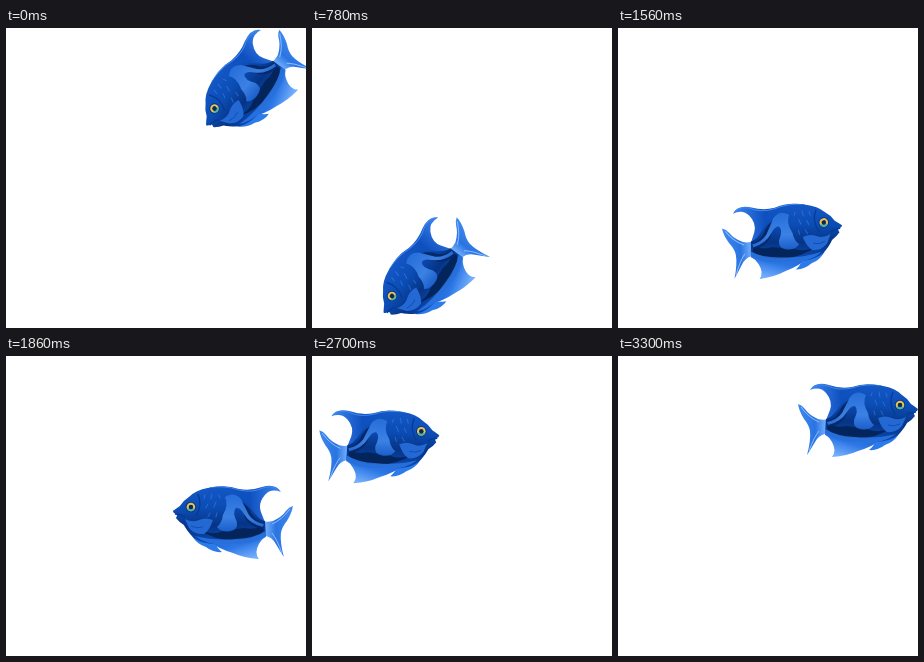
An HTML page that plays this animation: 300 by 300 pixels, repeating every 3360 ms.

```html
<!DOCTYPE html>
<html lang="en">
<head>
<meta charset="utf-8">
<title>Blue fish</title>
<style>
html, body { margin: 0; width: 100%; height: 100%; overflow: hidden; background: #fff; }
svg { display: block; width: 100vw; height: 100vh; }
</style>
</head>
<body>
<svg viewBox="0 0 300 300">
  <defs>
    <linearGradient id="body" x1="0" y1="0" x2="0.1" y2="1">
      <stop offset="0" stop-color="#1559c8"/>
      <stop offset="0.4" stop-color="#0b4cb4"/>
      <stop offset="0.7" stop-color="#063484"/>
      <stop offset="1" stop-color="#0b4ab4"/>
    </linearGradient>
    <linearGradient id="dorsal" x1="0" y1="0" x2="1" y2="0">
      <stop offset="0" stop-color="#1358c8"/>
      <stop offset="0.6" stop-color="#0f50bf"/>
      <stop offset="1" stop-color="#3f88f0"/>
    </linearGradient>
    <linearGradient id="anal" x1="0" y1="0" x2="0.7" y2="1">
      <stop offset="0" stop-color="#0d50c4"/>
      <stop offset="0.6" stop-color="#2d78e6"/>
      <stop offset="1" stop-color="#74aefc"/>
    </linearGradient>
    <linearGradient id="tail" x1="0" y1="0" x2="1" y2="0">
      <stop offset="0" stop-color="#1a5fd2"/>
      <stop offset="0.3" stop-color="#6aa8f8"/>
      <stop offset="0.55" stop-color="#2a74e2"/>
      <stop offset="1" stop-color="#3f88f0"/>
    </linearGradient>
    <linearGradient id="band" x1="0" y1="0" x2="0" y2="1">
      <stop offset="0" stop-color="#2a70dc"/>
      <stop offset="0.6" stop-color="#4189ec"/>
      <stop offset="1" stop-color="#1c62d2"/>
    </linearGradient>
  </defs>
  <g id="fish">
    <!-- tail -->
    <path fill="url(#tail)" d="M22-3Q32 1 40-1Q49-5 53-11Q56-15 60-16Q59-9 54-1Q49 5 48 11Q47 20 51 35Q47 29 43 22Q39 15 33 14L22 16Z"/>
    <path fill="none" stroke="#8bbcfc" stroke-width="1" d="M39 2Q49-2 57-13M39 11Q44 17 49 31"/>
    <!-- anal and pelvic fins -->
    <path fill="url(#anal)" d="M-26 18Q-14 27 0 31Q11 36 26 37Q21 31 26 22Q28 18 33 14L10 10Z"/>
    <path fill="#2d7bea" d="M-41 14Q-36 22-27 25Q-19 31-11 30Q-16 26-18 20Z"/>
    <!-- dorsal fin -->
    <path fill="url(#dorsal)" d="M-30-32Q-11-39 6-33Q18-31 29-35Q43-39 48-30Q38-34 32-27Q25-19 28-10L32 0L10-3Z"/>
    <path fill="none" stroke="#3f88ee" stroke-width="1" d="M-24-34Q-9-37 6-32Q20-29 30-34Q40-37 46-32"/>
    <!-- body -->
    <path fill="url(#body)" d="M-60-11Q-56-14-53-16Q-49-22-44-25Q-37-32-25-34Q-9-36 5-29C17-22 20-4 32-1L33 14Q20 22 0 22C-20 23-34 22-42 13Q-47 7-49 3Q-54 0-57-4Q-55-7-57-8Q-60-9-60-11Z"/>
    <path fill="#04245c" d="M-33 8Q-20 14-10 9Q2 7 12 6Q22 8 30 4L31 9Q22 18 4 18Q-18 19-33 8Z"/>
    <path fill="#2c76e2" d="M-38 14Q-18 19 3 17Q22 16 33 9L33 15Q20 23 2 23Q-24 25-38 14Z" opacity=".85"/>
    <path fill="#04296c" d="M9-20Q16-16 19-8Q24 0 31 1Q32 5 29 7Q18 5 13-3Q9-10 9-20Z"/>
    <!-- arched band -->
    <path fill="url(#band)" d="M-8-25Q1-31 8-23Q11-17 16-7Q21 0 31 2L30 5Q17 2 11-8Q7-15 3-14Q-1-10 4 0Q5 8-2 9Q-11 11-16 5Q-11 1-10-7Q-4-17-8-25Z" opacity=".9"/>
    <path fill="none" stroke="#3a82e6" stroke-width="1" stroke-linecap="round" opacity=".6"
      d="M-28-27l-1 4M-21-28l-1 5M-25-18l-2 4M-17-20l-2 5M-14-27l1 3M-23-9l-2 4M-16-9l-1 4"/>
    <!-- head -->
    <path fill="none" stroke="#073a94" stroke-width="1.3" d="M-35-28Q-30-17-37-6M-58-8Q-52-8-48-5"/>
    <path fill="#2468d4" d="M-48-3Q-40 1-34-2Q-27-5-20-2Q-23 8-29 12Q-38 13-44 6Z"/>
    <path fill="none" stroke="#0b49b0" stroke-width=".8" d="M-42 4Q-36 7-30 5"/>
    <circle cx="-42" cy="-15" r="5.2" fill="#06357f"/>
    <circle cx="-42" cy="-15" r="4.3" fill="#e8c458"/>
    <path fill="#4fb0a8" d="M-46-13.5A4.3 4.3 0 0 0-38-13.5Z"/>
    <circle cx="-42" cy="-15" r="2.3" fill="#0a2a50"/>
  </g>
</svg>
<script>
const LOOP = 3360, TICK = 60;
const fish = document.getElementById('fish');

// Each leg: visible from `show`, moving from `start` to `end`; `ease` holds the x and y powers.
const legs = [
  { show: 0, start: 60, end: 780, from: [247, 58], to: [118.5, 245.5], ease: [0.67, 1.22], turn: [-50, -50], face: 1 },
  { show: 780, start: 780, end: 1020, from: [118.5, 245.5], to: [70, 254], ease: [1, 0.8], turn: [-50, 0], face: 1 },
  { show: 1080, start: 1140, end: 1680, from: [65, 255], to: [206, 197], ease: [1.37, 1.22], turn: [-4, -4], face: -1 },
  { show: 1800, start: 1800, end: 2520, from: [236, 167.5], to: [61, 87], ease: [1.19, 1.6], turn: [0, 0], face: 1 },
  { show: 2580, start: 2640, end: 3300, from: [59.5, 93], to: [240, 64], ease: [1.31, 1], turn: [0, 0], face: -1 }
];

const mix = (a, b, p) => a + (b - a) * p;

function draw(time) {
  const t = Math.floor((time % LOOP) / TICK) * TICK;
  const leg = legs.findLast(l => t >= l.show);
  const p = Math.max(0, (t - leg.start) / (leg.end - leg.start));
  const [x, y] = leg.from.map((v, i) => mix(v, leg.to[i], p ** leg.ease[i]));
  const angle = mix(...leg.turn, Math.min(p, 1));
  fish.setAttribute('transform', `translate(${x} ${y}) rotate(${angle}) scale(${leg.face} 1)`);
}

const begin = performance.now();
function loop() {
  draw(performance.now() - begin);
  requestAnimationFrame(loop);
}
loop();
</script>
</body>
</html>
```
